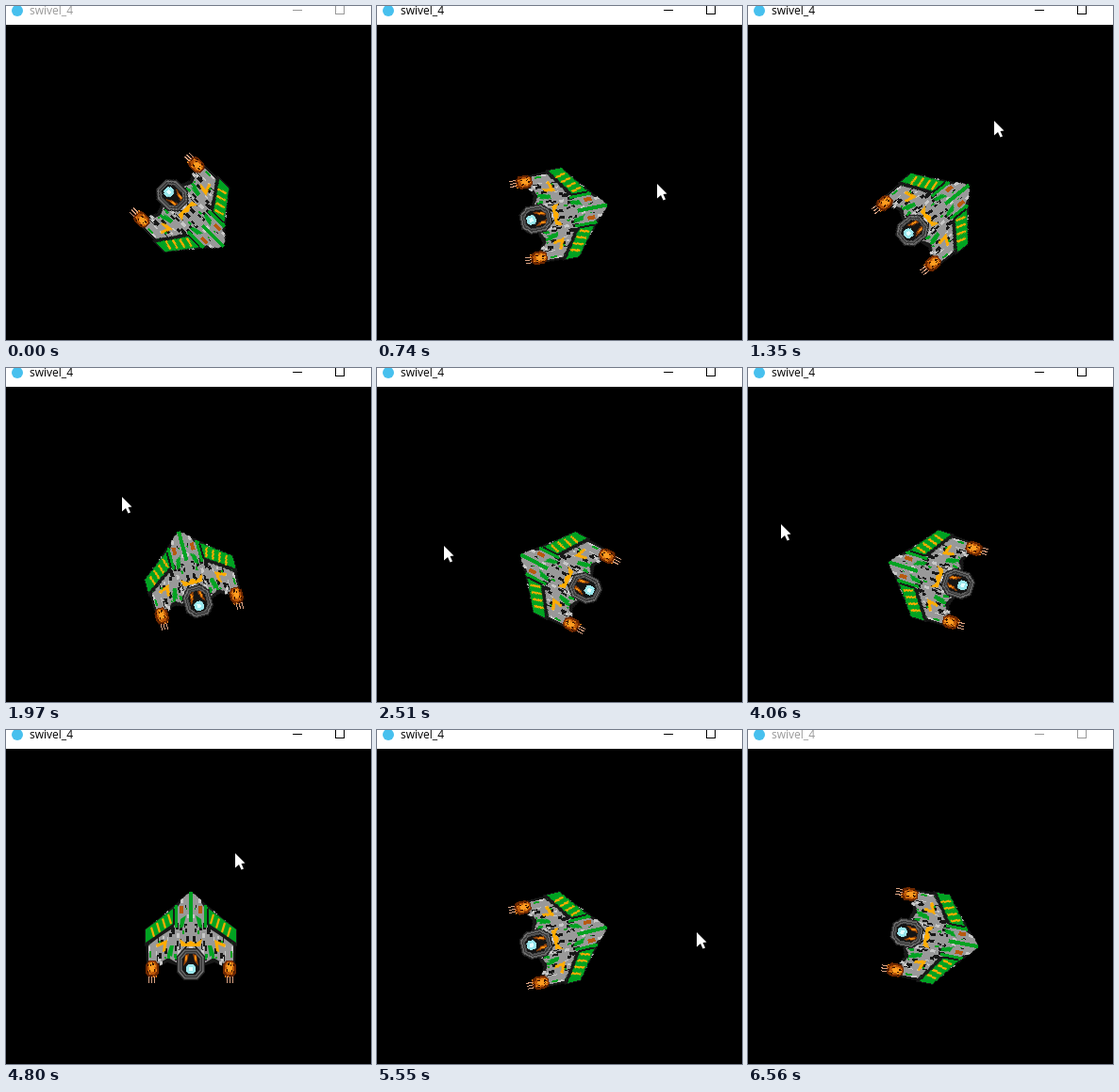
Animation of 387 by 355 pixels, one loop 6690 ms. Source, as an HTML page with a canvas:

```html
<!DOCTYPE html>
<html lang="en">
<head>
<meta charset="utf-8">
<title>Ship follows pointer</title>
<style>
html, body { margin: 0; width: 100%; height: 100%; overflow: hidden; background: #000; }
canvas { display: block; }
</style>
</head>
<body>
<canvas id="stage" width="387" height="355"></canvas>
<script>
const LOOP = 6690, STEP = 67.7;
const APPEAR = 200, ACTIVATE = 740, LEAVE = 5955, DEACTIVATE = 6560;
const LAG = 200; // the ship aims where the pointer was this long ago
const CENTER = { x: 196, y: 221 };
const GREEN = '#00a322', DARK = '#181818', GRAY = '#999', LIGHT = '#c8c8c8', AMBER = '#ffac00', RUST = '#b85a10';
const ctx = document.getElementById('stage').getContext('2d');

// turning points of the pointer: time, x, y
const path = [
  [200, 313, 309], [460, 284, 222], [590, 297, 189], [940, 297, 189],
  [1350, 261, 122], [1770, 158, 93], [1970, 121, 140], [2310, 80, 162],
  [2910, 50, 249], [3110, 99, 310], [3450, 85, 305], [3720, 37, 215],
  [3860, 22, 165], [4200, 45, 167], [4330, 160, 97], [4600, 196, 82],
  [4800, 243, 131], [5080, 311, 165], [5420, 339, 195], [5760, 338, 249], [5890, 337, 294]
];

function pointerAt(t) {
  const next = path.findIndex(key => key[0] > t);
  const [t1, x1, y1] = path.at(next);
  const [t0, x0, y0] = path.at(next < 0 ? -1 : Math.max(0, next - 1));
  const k = t1 > t0 ? (t - t0) / (t1 - t0) : 0;
  return { x: x0 + (x1 - x0) * k, y: y0 + (y1 - y0) * k };
}

function headingAt(t) {
  if (t < ACTIVATE - STEP / 2) return Math.PI * .75;
  const aim = pointerAt(Math.min(t, LEAVE) - LAG);
  return Math.atan2(aim.x - CENTER.x, CENTER.y - aim.y);
}

function poly(c, fill, ...p) {
  c.fillStyle = fill;
  c.beginPath();
  for (let i = 0; i < p.length; i += 2) c.lineTo(p[i], p[i + 1]);
  c.fill();
}

function rect(c, fill, x, y, w, h) {
  c.fillStyle = fill;
  c.fillRect(x, y, w, h);
}

function octagon(c, fill, x, y, w, h) {
  poly(c, fill, x - w / 2, y - h, x + w / 2, y - h, x + w, y - h / 2, x + w, y + h / 2,
    x + w / 2, y + h, x - w / 2, y + h, x - w, y + h / 2, x - w, y - h / 2);
}

function drawHalf(c) {
  let seed = 11;
  const random = n => (seed = seed * 16807 % 2147483647) % n;

  poly(c, DARK, 0, -50, 16, -36, 48, -9, 47, 29, 34, 30, 25, 26, 13, 30, 0, 15);
  poly(c, GRAY, 0, -48, 5, -46, 14, -33, 17, -14, 45, 8, 45, 26, 34, 27, 24, 21, 14, 27, 0, 11);

  // small panels scattered over the hull
  c.globalCompositeOperation = 'source-atop';
  const paints = [DARK, LIGHT, DARK, LIGHT, GRAY, GREEN];
  for (let i = 0; i < 110; i++) {
    rect(c, paints[i % paints.length], random(44), random(70) - 44, 1 + random(3), 2 + random(6));
  }
  c.globalCompositeOperation = 'source-over';

  // striped wing
  poly(c, DARK, 18, -32, 49, -9, 49, 9, 18, -11);
  poly(c, GREEN, 19, -31, 48, -9, 48, 5, 19, -15);
  for (let x = 23; x < 47; x += 6) {
    const y = x * .76 - 43;
    poly(c, AMBER, x, y, x + 2, y + 1, x - 1, y + 11, x - 3, y + 10);
  }

  // markings
  rect(c, GREEN, 0, -49, 2, 32);
  rect(c, GREEN, 14, -35, 3, 24);
  rect(c, RUST, 8, -34, 4, 8);
  poly(c, GREEN, 5, -24, 11, -20, 12, -10, 8, -12);
  poly(c, AMBER, 25, 2, 37, 7, 36, 10, 29, 7, 30, 15, 27, 14);
  poly(c, GREEN, 18, 8, 22, 8, 25, 17, 20, 20);
  poly(c, AMBER, 0, 3, 5, 6, 12, 1, 10, 9, 0, 9);

  // engine flame
  ['#6e2800', '#b85408', '#ff9d20'].forEach((fill, i) => octagon(c, fill, 41, 33 - i, 7 - i * 2, 9 - i * 2));
  for (let i = 0; i < 25; i++) rect(c, i % 2 ? '#3a1400' : '#e08018', 36 + random(10), 26 + random(15), 1, 2);
  for (let x = 38; x < 46; x += 3) rect(c, '#d8a080', x, 41, 1, 7);
}

function makeShip() {
  const ship = document.createElement('canvas');
  ship.width = ship.height = 104;
  const c = ship.getContext('2d');
  c.translate(52, 52);
  for (const side of [1, -1]) {
    c.save();
    c.scale(side, 1);
    drawHalf(c);
    c.restore();
  }

  // cockpit
  ['#222', '#777', '#333', '#666', '#141414'].forEach((fill, i) => octagon(c, fill, 0, 28, 15 - i * 1.4, 17 - i * 1.4));
  for (const side of [1, -1]) {
    poly(c, '#984408', side * 2, 17, side * 6, 18, side * 8, 30, side * 4, 25);
    poly(c, '#f08c10', side * 4, 18, side * 6, 20, side * 6, 25, side * 4, 23);
  }
  octagon(c, '#9be9ef', 0, 33, 5, 5);
  rect(c, '#e4ffff', -2, 31, 4, 4);
  return ship;
}

function drawTitleBar(active) {
  const ink = active ? '#000' : '#999';
  rect(ctx, '#fff', 0, 0, 387, 20);
  ctx.fillStyle = '#47c0ee';
  ctx.beginPath();
  ctx.arc(12, 5, 6, 0, 7);
  ctx.fill();
  ctx.fillStyle = ink;
  ctx.font = '12px "Open Sans", sans-serif';
  ctx.fillText('swivel_4', 25, 9);
  ctx.fillRect(304, 4, 10, 1);
  ctx.strokeStyle = ink;
  ctx.strokeRect(349.5, -.5, 9, 9);
}

function drawPointer({ x, y }) {
  ctx.save();
  ctx.translate(Math.round(x), Math.round(y));
  poly(ctx, '#fff', 0, 0, 10.5, 10.5, 6.5, 11, 9, 16.5, 6.5, 17.5, 4, 12, 0, 15.5);
  ctx.restore();
}

const ship = makeShip();
const start = performance.now();

function draw() {
  const t = (performance.now() - start) % LOOP;
  const held = Math.max(0, 1010 + Math.floor((t - 1008) / STEP) * STEP);
  rect(ctx, '#000', 0, 0, 387, 355);
  drawTitleBar(t >= ACTIVATE && t < DEACTIVATE);

  ctx.save();
  ctx.imageSmoothingEnabled = false;
  ctx.translate(CENTER.x, CENTER.y);
  ctx.rotate(headingAt(held));
  ctx.drawImage(ship, -52, -52);
  ctx.restore();

  if (t >= APPEAR && t < LEAVE) drawPointer(pointerAt(held));
  requestAnimationFrame(draw);
}

draw();
</script>
</body>
</html>
```
